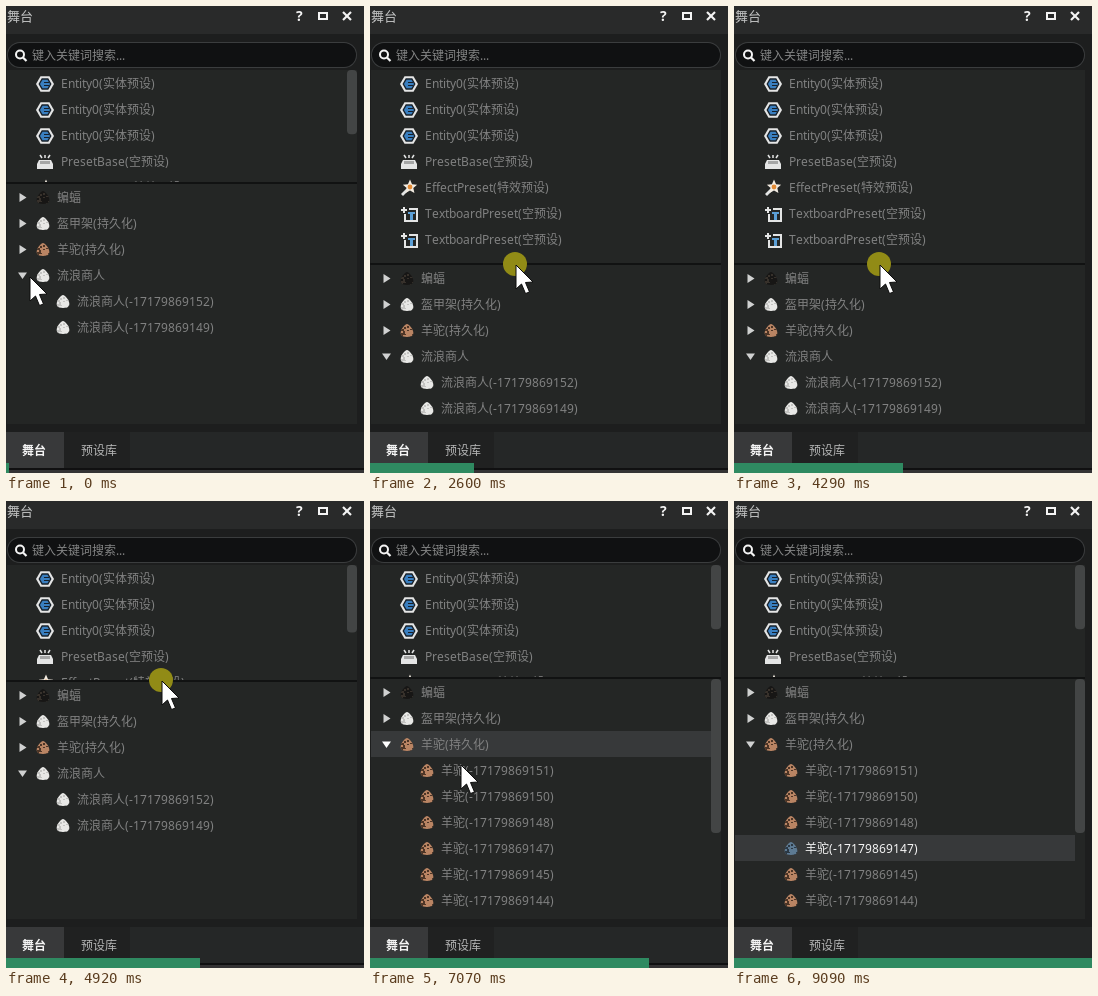
An HTML page with a canvas for the animation above (9180 ms loop, 358 px wide and 467 px high).

```html
<!DOCTYPE html>
<html lang="zh-CN">
<head>
<meta charset="utf-8">
<style>
html, body { margin: 0; width: 358px; height: 467px; overflow: hidden; background: #1d1e1e; }
canvas { display: block; }
</style>
</head>
<body>
<canvas id="stage" width="358" height="467"></canvas>
<script>
const ctx = document.getElementById('stage').getContext('2d');
const LOOP = 9180, STEP = 70, LAST = 130;
const ROW = 26, TOP = 64, BOTTOM = 418, HIGH = 177, LOW = 258;
const FAMILY = '"Noto Sans", "Noto Sans CJK SC", "Noto Sans CJK", sans-serif';
const GREY = '#808181', WHITE = '#f4f4f4', PALE = '#e4e5e5', HOVER = '#37393a', PANEL = '#242625';

const presets = [
  ...Array(3).fill({ label: 'Entity0(实体预设)', icon: entity }),
  { label: 'PresetBase(空预设)', icon: tray, id: 'base' },
  { label: 'EffectPreset(特效预设)', icon: wand },
  ...Array(2).fill({ label: 'TextboardPreset(空预设)', icon: board })
];
const eggs = {
  bat: ['#171615', '#37312b'], plain: ['#e8e8e6', '#c4c4c2'],
  alpaca: ['#b98463', '#4d3526'], chosen: ['#5d7a93', '#2b3844']
};

// the session is written as a script of pointer moves and state changes
let clock = 0, px = 24, py = 271;
const moves = [], events = [];
const wait = ms => { clock += ms; };
const set = change => events.push({ t: clock, change });
function go(ms, x, y) {
  moves.push({ t: clock, ms, x0: px, y0: py, x, y });
  px = x;
  py = y;
  wait(ms);
}
function click(change) {
  set({ down: true, ...change });
  wait(120);
  set({ down: false });
}

set({ focus: '', down: false, drag: false, trader: true, alpaca: false, chosen: 0 });
go(300, 18, 270);
click({ focus: 'trader' });
wait(580);
go(500, 148, 175);
wait(500);
set({ down: true, drag: true, focus: '' });
for (const [i, ms] of [540, 540, 850, 700].entries()) {
  i % 2 ? go(ms, 158, 173 - 4 * (i - 1)) : go(ms, 146, LOW + 1);
  wait(150);
}
set({ down: false, drag: false, focus: 'base' });
go(470, 30, 276);
wait(150);
go(150, 17, 269);
click({ focus: 'trader', trader: false });
go(200, 17, 244);
click({ focus: 'alpaca', alpaca: true });
go(500, 91, 264);
wait(260);
set({ focus: 151 });
for (const n of [150, 148, 147]) {
  go(270, px + 2, py + ROW);
  set({ focus: n });
  wait(60);
}
click({ chosen: 147 });
go(320, 110, 480);

function pointer(t) {
  const m = moves.filter(m => m.t <= t).pop();
  const u = Math.min(1, (t - m.t) / m.ms), e = u * u * (3 - 2 * u);
  return [Math.round(m.x0 + (m.x - m.x0) * e), Math.round(m.y0 + (m.y - m.y0) * e)];
}
function stateAt(t) {
  return Object.assign({}, ...events.filter(e => e.t <= t).map(e => e.change));
}

function rect(x, y, w, h, color) {
  ctx.fillStyle = color;
  ctx.fillRect(x, y, w, h);
}
function box(x, y, w, h, width, color) {
  ctx.strokeStyle = color;
  ctx.lineWidth = width;
  ctx.strokeRect(x, y, w, h);
}
function pill(x, y, w, h, r, color) {
  ctx.fillStyle = color;
  ctx.beginPath();
  ctx.roundRect(x, y, w, h, r);
  ctx.fill();
}
function fillShape(points, x, y, color) {
  ctx.beginPath();
  points.forEach(([dx, dy]) => ctx.lineTo(x + dx, y + dy));
  ctx.closePath();
  ctx.fillStyle = color;
  ctx.fill();
}
// points around a circle; a second radius makes a star
function ring(n, r, r2 = r, turn = 0) {
  return Array.from({ length: n }, (_, i) => {
    const a = turn + i * 2 * Math.PI / n, d = i % 2 ? r2 : r;
    return [d * Math.cos(a), d * Math.sin(a)];
  });
}
function disc(x, y, r, color) {
  ctx.fillStyle = color;
  ctx.beginPath();
  ctx.arc(x, y, r, 0, 7);
  ctx.fill();
}
function line(x0, y0, x1, y1, width, color) {
  ctx.strokeStyle = color;
  ctx.lineWidth = width;
  ctx.beginPath();
  ctx.moveTo(x0, y0);
  ctx.lineTo(x1, y1);
  ctx.stroke();
}
// glyphs advance by whole pixels, as in a hinted interface
function text(s, x, mid, color, size = 12, weight = '') {
  ctx.font = `${weight} ${size}px ${FAMILY}`;
  ctx.fillStyle = color;
  for (const c of s) {
    ctx.fillText(c, x, mid + 5);
    x += Math.round(ctx.measureText(c).width);
  }
}
function clipTo(y, h, paint) {
  ctx.save();
  ctx.beginPath();
  ctx.rect(0, y, 358, h);
  ctx.clip();
  paint();
  ctx.restore();
}

function entity(x, y) {
  fillShape(ring(6, 9), x, y, PALE);
  fillShape(ring(6, 6.5), x, y, '#17202a');
  fillShape(ring(6, 5), x, y, '#3a7fc0');
  rect(x - 1, y - 2, 5, 1, '#17202a');
  rect(x - 1, y + 1, 5, 1, '#17202a');
}
function tray(x, y) {
  fillShape([[-6, -2], [6, -2], [8, 2], [8, 7], [-8, 7], [-8, 2]], x, y, PALE);
  rect(x - 5, y - 1, 10, 3, '#a5a6a6');
  for (const d of [-1, 0, 1]) line(x + d * 5, y - 7, x + d * 3, y - 4, 1.5, PALE);
}
function wand(x, y) {
  line(x - 7, y + 7, x, y, 2.8, PALE);
  fillShape(ring(10, 7.5, 3.5, -Math.PI / 2), x + 1, y - 1, '#f3ece2');
  disc(x + 1, y - 1, 2.4, '#e28a35');
}
function board(x, y) {
  box(x - 4, y - 5, 12, 12, 2, PALE);
  rect(x - 9, y - 9, 9, 9, PANEL);
  rect(x - 8, y - 5, 6, 2, PALE);
  rect(x - 6, y - 7, 2, 6, PALE);
  rect(x - 1, y - 2, 7, 2, '#5b9fd6');
  rect(x + 1, y - 2, 3, 8, '#5b9fd6');
}
function egg(kind, x, y) {
  const [base, spot] = eggs[kind];
  ctx.save();
  ctx.beginPath();
  ctx.moveTo(x, y - 7);
  ctx.bezierCurveTo(x + 4, y - 6, x + 12, y + 6, x, y + 6);
  ctx.bezierCurveTo(x - 12, y + 6, x - 4, y - 6, x, y - 7);
  ctx.clip();
  rect(x - 7, y - 7, 14, 14, base);
  let seed = 11;
  const rnd = n => Math.floor((seed = seed * 16807 % 2147483647) / 2147483647 * n);
  for (let i = 0; i < 17; i++) rect(x - 6 + rnd(12), y - 6 + rnd(12), 2, 1 + rnd(2), spot);
  ctx.restore();
}

function chrome() {
  rect(0, 0, 358, 467, '#1d1e1e');
  rect(0, 0, 358, 28, '#292a2a');
  text('舞台', 1, 10, '#c4c5c5', 13);
  text('?', 290, 10, WHITE, 14, 'bold');
  box(313, 7, 8, 6, 2, WHITE);
  for (const d of [-4, 4]) line(341 - d, 6, 341 + d, 14, 2.2, WHITE);

  pill(1, 36, 350, 26, 13, '#3b3d3e');
  pill(2, 37, 348, 24, 12, '#101112');
  disc(14, 48.5, 5, WHITE);
  disc(14, 48.5, 3, '#101112');
  line(17, 51.5, 20.5, 55, 2.2, WHITE);
  text('键入关键词搜索...', 26, 49, '#858686');

  rect(1, TOP, 350, BOTTOM - TOP, PANEL);
  rect(0, 426, 358, 36, '#252727');
  rect(0, 426, 58, 36, '#38393a');
  rect(58, 426, 66, 36, '#202121');
  text('舞台', 16, 444, WHITE, 12, 'bold');
  text('预设库', 75, 444, '#b4b5b5');
  rect(0, 462, 358, 2, '#101011');
  rect(0, 464, 358, 3, '#343334');
}
function band(mid, scroll) {
  rect(1, mid - 13, scroll ? 340 : 350, ROW, HOVER);
}
function thumb(y, h) {
  pill(341, y, 10, h, 4, '#434545');
}

function upperList(div, state) {
  const h = div - TOP, scroll = h < presets.length * ROW;
  presets.forEach(({ label, icon, id }, i) => {
    const mid = TOP + 13 + i * ROW;
    if (id && id === state.focus) band(mid, scroll);
    icon(39, mid + 1);
    text(label, 55, mid, GREY);
  });
  if (scroll) thumb(TOP, h * h / 199);
}

function treeRows({ trader, alpaca }) {
  const kids = (name, kind, ids) =>
    ids.map(id => ({ id, label: `${name}(-17179869${id})`, kind, child: true }));
  return [
    { id: 'bat', label: '蝙蝠', kind: 'bat' },
    { id: 'armor', label: '盔甲架(持久化)', kind: 'plain' },
    { id: 'alpaca', label: '羊驼(持久化)', kind: 'alpaca', open: alpaca },
    ...(alpaca ? kids('羊驼', 'alpaca', [151, 150, 148, 147, 145, 144]) : []),
    { id: 'trader', label: '流浪商人', kind: 'plain', open: trader },
    ...(trader ? kids('流浪商人', 'plain', [152, 149]) : [])
  ];
}

function lowerList(div, state) {
  const scroll = state.alpaca;
  treeRows(state).forEach((row, i) => {
    const mid = div + 14 + i * ROW, on = row.id === state.focus;
    const chosen = row.id === state.chosen;
    if (on) band(mid, scroll);
    if (!row.child) {
      const tri = row.open ? [[-4.5, -3], [4.5, -3], [0, 3.5]] : [[-3, -4.5], [4, 0], [-3, 4.5]];
      fillShape(tri, 16.5, mid + 0.5, on ? '#ffffff' : '#d0d1d1');
    }
    const x = row.child ? 57 : 37;
    egg(chosen ? 'chosen' : row.kind, x, mid + 1);
    text(row.label, x + 14, mid, chosen ? WHITE : GREY);
  });
  if (scroll) thumb(div + 1, 154);
}

function arrow(x, y) {
  const points = [[0, 0], [0, 24], [5.5, 19], [9.5, 28.5], [13.5, 27], [9.5, 17.5], [17, 17]];
  fillShape(points, x, y, '#ffffff');
  ctx.strokeStyle = '#0c0c0c';
  ctx.lineWidth = 1;
  ctx.stroke();
}

function draw(now) {
  const step = Math.min(LAST, Math.floor((now % LOOP + 10) / STEP));
  const t = step * STEP, state = stateAt(t), [x, y] = pointer(t);
  const div = state.drag ? Math.max(HIGH, Math.min(LOW, y)) : HIGH;
  chrome();
  clipTo(TOP, div - TOP - 1, () => upperList(div, state));
  clipTo(div, BOTTOM - div, () => lowerList(div, state));
  rect(0, div - 1, 351, 2, '#111212');
  if (state.down) disc(x - 1, y - 1, 12, '#918b16');
  arrow(x, y);
  rect(0, 457, Math.round(358 * (step + 1) / (LAST + 1)), 10, '#2f8a61');
}

let start;
function tick(now) {
  start ??= now;
  draw(now - start);
  requestAnimationFrame(tick);
}
draw(0);
requestAnimationFrame(tick);
</script>
</body>
</html>
```
